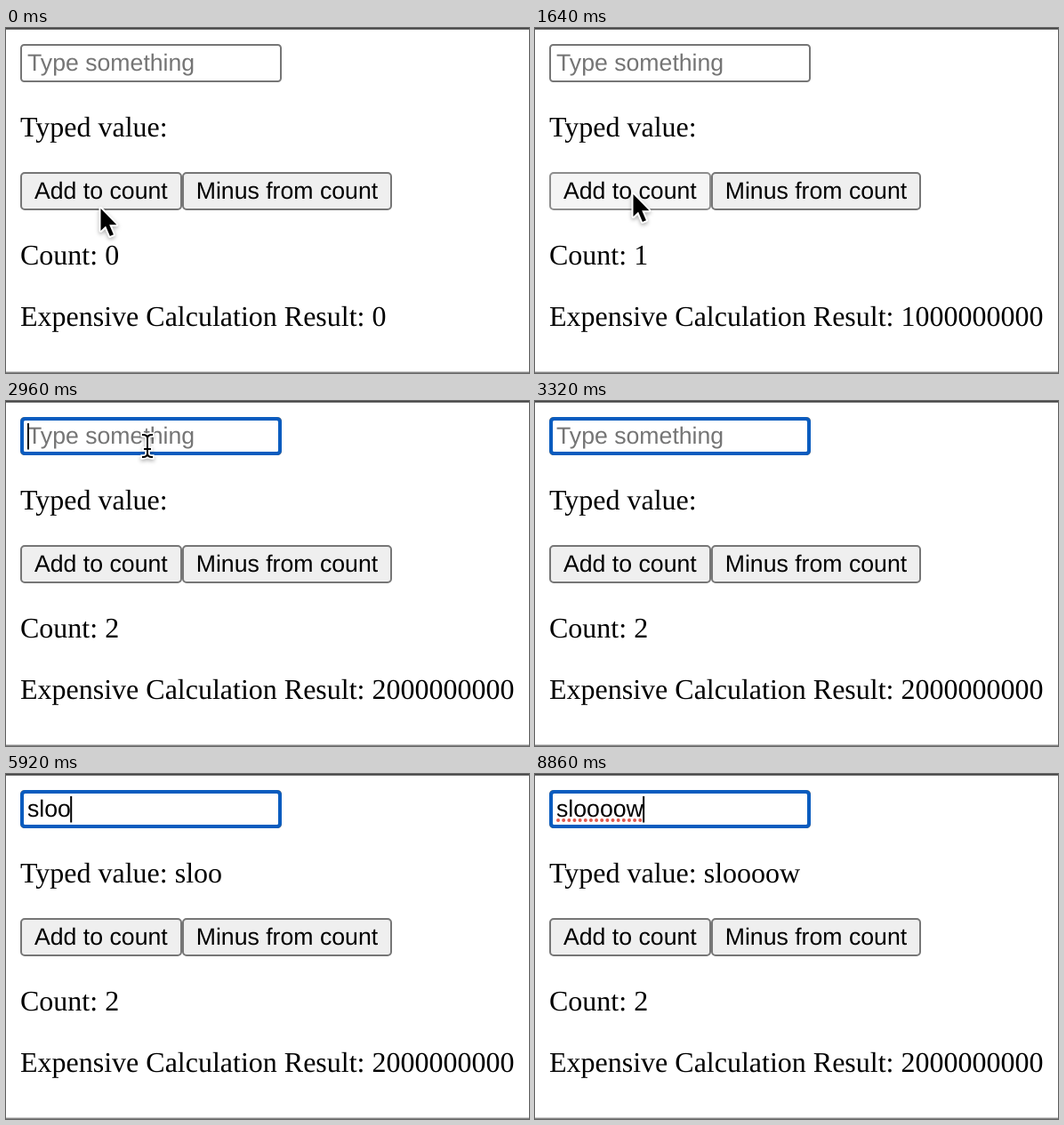
An HTML page that plays this animation: 588x388 px, repeating every 8.94 s.

```html
<!DOCTYPE html>
<html lang="en">
<head>
<meta charset="utf-8">
<title>Slow counter</title>
<style>
  html, body { margin: 0; width: 100%; height: 100%; overflow: hidden; background: #fff; }
  svg { display: block; width: 588px; height: 388px; }
  text { white-space: pre; text-rendering: geometricPrecision; }
  .serif { font: 32px "Liberation Serif", Times, serif; }
  .sans { font: 26.667px "Liberation Sans", Arial, sans-serif; }
  .box { fill: #efefef; stroke: #767676; stroke-width: 2; }
  .hover { fill: #e5e5e5; stroke: #4f4f4f; }
  .active { fill: #f5f5f5; stroke: #8d8d8d; }
  #field { fill: #fff; }
  #ring { fill: none; stroke: #0a5cbf; stroke-width: 4; }
  #dots { stroke: #e2574c; stroke-width: 4; stroke-linecap: round; stroke-dasharray: 0 6.15; }
  #arrow, #beam { filter: drop-shadow(0 2px 2px rgba(0, 0, 0, .3)); }
</style>
</head>
<body>
<svg viewBox="0 0 588 388">
  <rect width="588" height="1.7" fill="#444"/>
  <rect y="386.6" width="588" height="1.4" fill="#858585"/>

  <rect id="field" class="box" x="17" y="19" width="292" height="41" rx="3.5"/>
  <rect id="ring" x="18" y="20" width="290" height="39" rx="3.5"/>
  <text id="input" class="sans" x="24" y="48"></text>
  <path id="dots" d="M26 52H121"/>
  <rect id="caret" y="25" width="2" height="29.5"/>

  <text id="typed" class="serif" x="16" y="122"></text>
  <rect id="add" class="box" x="17" y="163" width="180" height="41" rx="4"/>
  <rect class="box" x="199" y="163" width="234" height="41" rx="4"/>
  <text class="sans" x="32" y="192">Add to count</text>
  <text class="sans" x="213.7" y="192">Minus from count</text>
  <text id="count" class="serif" x="16" y="266"></text>
  <text id="result" class="serif" x="16" y="335"></text>

  <path id="arrow" d="M0 0V25L5.6 19.8L10.4 31L14.4 29.3L9.7 18.3H17.8Z"
    stroke="#fff" stroke-width="4" stroke-linejoin="round" paint-order="stroke"/>
  <g id="beam" fill="none" stroke-linecap="square">
    <path id="stem" d="M-5 -12Q0 -12 0 -8Q0 -12 5 -12M0 -8V9M-5 13Q0 13 0 9Q0 13 5 13M-3 4H3" stroke="#fff" stroke-width="5"/>
    <use href="#stem" style="stroke:#000"/>
    <path d="M-5 -12Q0 -12 0 -8Q0 -12 5 -12M0 -8V9M-5 13Q0 13 0 9Q0 13 5 13M-3 4H3" stroke="#000" stroke-width="2"/>
  </g>
</svg>
<script>
const LOOP = 8940;
const $ = id => document.getElementById(id);

// Each row: start time, value held until the next row.
const counts = [[0, 0], [840, 1], [2080, 2]];
const words = [[0, ""], [3860, "s"], [4680, "sl"], [5920, "sloo"], [6440, "slooo"],
  [7300, "sloooo"], [7820, "sloooow"]];
const button = [[0, ""], [100, "hover"], [300, "active"], [840, "hover"],
  [1560, "active"], [2080, "hover"], [2160, ""]];
const caret = [[0, 0], [2740, 1], [3240, 0], [3860, 1], [8340, 0], [8860, 1]];
const pointer = [[0, "arrow"], [2340, "beam"], [3320, ""]];

// Pointer path: time, x, y.
const path = [[20, 106.5, 203], [320, 110.5, 187], [2040, 110.5, 187],
  [2300, 146, 66], [2460, 156, 46], [2700, 159, 50]];

const at = (rows, t) => rows.filter(r => r[0] <= t).pop()[1];
const show = (id, on) => $(id).style.display = on ? "" : "none";
const set = (id, s) => { if ($(id).textContent !== s) $(id).textContent = s; };

function place(t) {
  const i = path.findIndex(p => p[0] > t);
  if (i === 0) return path[0].slice(1);
  if (i < 0) return path[path.length - 1].slice(1);
  const [a, b] = [path[i - 1], path[i]];
  const k = (t - a[0]) / (b[0] - a[0]);
  const e = k * k * (3 - 2 * k);
  return [1, 2].map(n => a[n] + (b[n] - a[n]) * e);
}

const glyphs = { s: .5, l: .222, o: .556, w: .722 };
const measure = s => [...s].reduce((sum, c) => sum + glyphs[c] * 26.667, 0);

function draw(t) {
  const n = at(counts, t), word = at(words, t), kind = at(pointer, t);
  set("count", "Count: " + n);
  set("result", "Expensive Calculation Result: " + n * 1e9);
  set("typed", "Typed value: " + word);
  set("input", word || "Type something");
  $("input").setAttribute("fill", word ? "#000" : "#757575");
  $("add").setAttribute("class", "box " + at(button, t));
  show("ring", t >= 2740);
  show("dots", t >= 8860);
  show("caret", at(caret, t));
  $("caret").setAttribute("x", 24 + measure(word) - (word ? .7 : 0));
  const [x, y] = place(t);
  for (const id of ["arrow", "beam"]) {
    show(id, kind === id);
    $(id).setAttribute("transform", `translate(${x} ${y})`);
  }
}

const start = performance.now();
function tick() {
  draw((performance.now() - start) % LOOP);
  requestAnimationFrame(tick);
}
draw(0);
requestAnimationFrame(tick);
</script>
</body>
</html>
```
